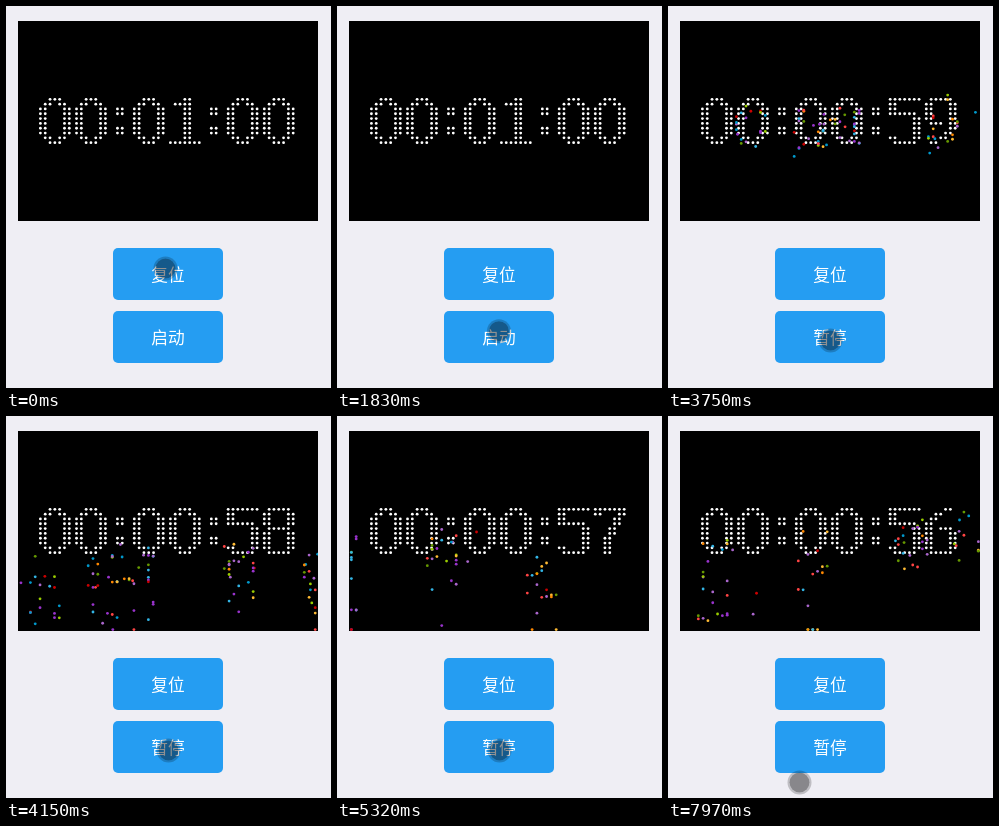
These frames come from a looping animation (325x382 px, 8 s). An HTML page with a canvas:

```html
<!DOCTYPE html>
<html lang="zh">
<head>
<meta charset="utf-8">
<title>倒计时</title>
<style>
  html, body { margin: 0; width: 325px; height: 382px; overflow: hidden; background: #efeef4; }
  body { position: relative; }
  canvas { position: absolute; left: 12px; top: 15px; background: #000; }
  .btn {
    position: absolute; left: 107px; width: 110px; height: 52px;
    border-radius: 5px; background: #259df2; color: #fff;
    font: 500 16.7px/52px "Noto Sans CJK SC", "Noto Sans CJK", "Noto Sans", sans-serif;
    text-align: center;
  }
  #reset { top: 242px; }
  #toggle { top: 305px; }
  #touch {
    position: absolute; left: -12px; top: -12px; width: 20px; height: 20px;
    border: 2px solid rgba(0, 0, 0, .2); border-radius: 50%;
    background: rgba(0, 0, 0, .43); background-clip: padding-box;
  }
</style>
</head>
<body>
<canvas id="clock" width="300" height="200"></canvas>
<div class="btn" id="reset">复位</div>
<div class="btn" id="toggle">启动</div>
<div id="touch"></div>
<script>
const LOOP = 8000, TICK = 37, PER_SECOND = 25;
const START = 2835, PAUSE_TICK = 79, RESUME = 7880;
const W = 300, H = 200, MARGIN = 20;
const UNIT = (W - 2 * MARGIN) / 108, R = UNIT - 1, TOP = H / 2 - 10 * UNIT;
const BOUNCE = .82;
const COLORS = ['#33b5e5', '#0099cc', '#aa66cc', '#9933cc', '#99cc00',
                '#669900', '#ffbb33', '#ff8800', '#ff4444', '#cc0000'];

const ctx = document.getElementById('clock').getContext('2d');
const toggle = document.getElementById('toggle');
const touch = document.getElementById('touch');

// Glyphs: for each row, which columns are lit. A pen is two dots wide.
const bar = (a, b) => col => col >= a && col <= b;
const pens = (...starts) => col => starts.some(s => col === s || col === s + 1);
const sides = pens(0, 5), full = bar(0, 6), cap = bar(1, 5);

const GLYPHS = {
  0: r => {
    const inset = Math.max(0, 2 - Math.min(r, 9 - r));
    return pens(inset, 5 - inset);
  },
  1: r => r === 9 ? full : r === 1 ? bar(1, 4) : pens(3),
  5: r => r === 0 ? full : r < 3 ? pens(0) : r === 3 ? bar(0, 5)
        : r < 8 ? pens(5) : r === 8 ? sides : cap,
  6: r => r === 0 ? pens(4) : r < 4 ? pens(3 - r)
        : r === 4 ? pens(0, 3, 4) : r < 9 ? sides : cap,
  7: r => r === 0 ? full : r === 1 ? sides : pens(Math.max(2, 5 - Math.floor(r / 2))),
  8: r => r % 9 === 0 || r === 4 ? cap : sides,
  9: r => col => GLYPHS[6](9 - r)(6 - col),
  ':': r => r % 4 > 1 ? bar(1, 2) : () => false
};

// Calls fn(x, y, slot) for every lit dot of the text.
function eachDot(text, fn) {
  let left = MARGIN;
  [...text].forEach((char, slot) => {
    for (let row = 0; row < 10; row++) {
      const lit = GLYPHS[char](row);
      for (let col = 0; col < 7; col++) {
        if (lit(col)) fn(left + (2 * col + 1) * UNIT, TOP + (2 * row + 1) * UNIT, slot);
      }
    }
    left += (char === ':' ? 9 : 15) * UNIT;
  });
}

function dot(x, y, color) {
  ctx.fillStyle = color;
  ctx.beginPath();
  ctx.arc(x, y, R, 0, 2 * Math.PI);
  ctx.fill();
}

function face(tick) {
  return tick < 0 ? '00:01:00' : '00:00:' + (59 - Math.floor(tick / PER_SECOND));
}

let seed = 20;
function rand() {
  seed = (seed * 1664525 + 1013904223) % 4294967296;
  return seed / 4294967296;
}

// Every digit that changes throws off one ball per dot.
const balls = [];
for (let birth = 0; birth <= PAUSE_TICK; birth += PER_SECOND) {
  const text = face(birth), old = face(birth - 1);
  eachDot(text, (x, y, slot) => {
    if (text[slot] === old[slot]) return;
    const speed = rand() < .85 ? 4 : 3 + 2 * rand();
    balls.push({
      birth, x, y,
      vx: rand() < .65 ? -speed : speed,
      g: 1.5 + rand(),
      color: COLORS[Math.floor(rand() * COLORS.length)]
    });
  });
}

function drawBall(ball, age) {
  const x = ball.x + ball.vx * age;
  if (age < 0 || x < -R || x > W + R) return;
  let y = ball.y, vy = -5;
  for (let i = 0; i < age; i++) {
    y += vy;
    vy += ball.g;
    if (y >= H - R) {
      y = H - R;
      vy *= -BOUNCE;
    }
  }
  dot(x, y, ball.color);
}

function tickAt(t) {
  if (t < RESUME) return Math.min(PAUSE_TICK, Math.floor((t - START) / TICK));
  return PAUSE_TICK + 1 + Math.floor((t - RESUME) / TICK);
}

const MOVES = [
  { from: 960, to: 961, x: 159.5, y: 265 },
  { from: 1270, to: 2060, x: 162.5, y: 339 },
  { from: 2340, to: 2370, x: 162.5, y: 334.5 },
  { from: 6525, to: 6610, x: 163, y: 367 },
  { from: 6790, to: 6940, x: 163, y: 344.5 },
  { from: 7090, to: 7270, x: 161, y: 334 },
  { from: 7740, to: 7960, x: 131.5, y: 366.5 }
];

function moveTouch(t) {
  let x = 159.5, y = 262.5;
  for (const m of MOVES) {
    const k = Math.min(1, Math.max(0, (t - m.from) / (m.to - m.from)));
    const eased = k * (1.5 - k / 2);
    x += (m.x - x) * eased;
    y += (m.y - y) * eased;
  }
  touch.style.transform = `translate(${x}px, ${y}px)`;
}

function frame() {
  const t = performance.now() % LOOP, tick = tickAt(t);
  ctx.clearRect(0, 0, W, H);
  eachDot(face(tick), (x, y) => dot(x, y, '#fff'));
  balls.forEach(ball => drawBall(ball, tick - ball.birth));
  toggle.textContent = t >= 2680 && t < 5750 || t >= 7740 ? '暂停' : '启动';
  moveTouch(t);
  requestAnimationFrame(frame);
}
frame();
</script>
</body>
</html>
```
